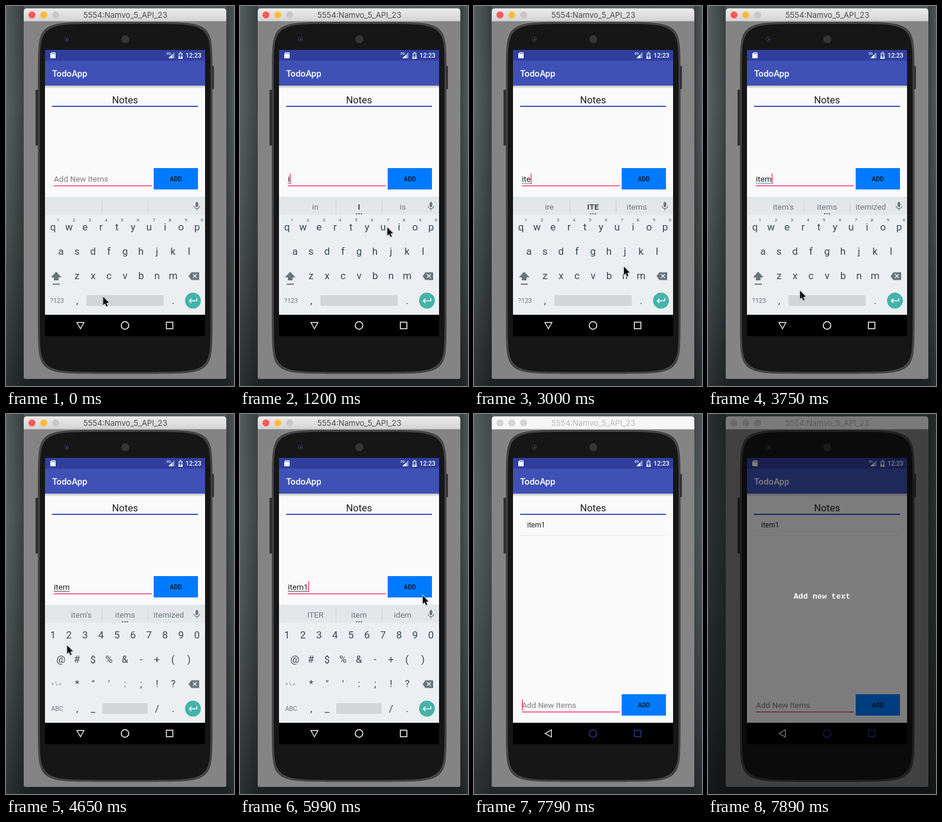
Recreate the animation shown at these times as an HTML page with a canvas. Size 386 px wide and 640 px high, loop 8 s.

```html
<!DOCTYPE html>
<html lang="en">
<head>
<meta charset="utf-8">
<title>Todo app demo</title>
<style>
html, body { margin: 0; width: 100%; height: 100%; overflow: hidden; background: #3b4445; }
canvas { display: block; }
</style>
</head>
<body>
<canvas id="stage" width="386" height="640"></canvas>
<script>
const ctx = document.getElementById('stage').getContext('2d');
const LOOP = 8000, STEP = 150;
const KEY_COLOR = '#37474f', SOFT_KEY = '#68757b', KEY_BG = '#eceff1';
const PINK = '#ff4081', INDIGO = '#3f51b5', STATUS = '#303f9f';

const KEY_STEP = 27.1, ROW_STEP = 41.25, ROW_INDENT = [79.5, 93, 120.3, 120.3];
const keyAt = (row, col) => ({ x: ROW_INDENT[row] + col * KEY_STEP, y: 372 + row * ROW_STEP });

// Pointer glides: leave time, arrival time, destination
const glides = [
  [-600, 0, { x: 164, y: 489 }],
  [0, 750, keyAt(0, 7)],
  [900, 1820, keyAt(0, 4)],
  [1820, 2300, keyAt(0, 2)],
  [2550, 3180, keyAt(2, 6)],
  [3300, 4050, { x: 86, y: 492 }],
  [4200, 4650, { x: 103, y: 389 }],
  [4650, 4950, keyAt(0, 0)],
  [5550, 5990, { x: 309, y: 305 }],
  [5990, 6590, { x: 300, y: 292 }],
  [6740, 7190, { x: 127, y: 538 }],
  [7190, 7340, { x: 121, y: 617 }]
];

const states = [
  { at: -600, entry: '', words: [] },
  { at: 900, entry: 'i', words: ['in', 'I', 'is'], strong: true },
  { at: 1650, entry: 'it', words: ['its', 'it', "it's"] },
  { at: 2550, entry: 'ite', words: ['ire', 'ITE', 'items'], strong: true },
  { at: 3300, entry: 'item', words: ["item's", 'items', 'itemized'] },
  { at: 4100, entry: 'item', words: ["item's", 'items', 'itemized'], symbols: true },
  { at: 5550, entry: 'item1', words: ['ITER', 'item', 'idem'], symbols: true },
  { at: 6890, entry: '', words: [], symbols: true, added: true },
  { at: 7340, entry: '', words: [], added: true, keyboardHidden: true }
];

function rect(x, y, w, h, color) {
  ctx.fillStyle = color;
  ctx.fillRect(x, y, w, h);
}

function round(x, y, w, h, r, color) {
  ctx.beginPath();
  ctx.roundRect(x, y, w, h, r);
  ctx.fillStyle = color;
  ctx.fill();
}

function disc(x, y, r, color) {
  ctx.beginPath();
  ctx.arc(x, y, r, 0, Math.PI * 2);
  ctx.fillStyle = color;
  ctx.fill();
}

function trace(points, closed) {
  ctx.beginPath();
  points.forEach(([x, y]) => ctx.lineTo(x, y));
  if (closed) ctx.closePath();
}

function fillPoly(color, ...points) {
  trace(points, true);
  ctx.fillStyle = color;
  ctx.fill();
}

function line(color, width, ...points) {
  trace(points, false);
  ctx.strokeStyle = color;
  ctx.lineWidth = width;
  ctx.stroke();
}

function text(str, x, y, size, color, { weight = 400, align = 'left', family = 'Roboto, sans-serif' } = {}) {
  ctx.font = `${weight} ${size}px ${family}`;
  ctx.textAlign = align;
  ctx.fillStyle = color;
  ctx.fillText(str, x, y);
}

const centered = (str, x, y, size, color, weight = 400) =>
  text(str, x, y, size, color, { weight, align: 'center' });

function gradient(x0, y0, x1, y1, ...colors) {
  const g = ctx.createLinearGradient(x0, y0, x1, y1);
  colors.forEach((c, i) => g.addColorStop(i / (colors.length - 1), c));
  return g;
}

function drawDesktop(active) {
  const shade = `rgba(0,0,0,${active ? 0.32 : 0.22})`;
  rect(0, 0, 386, 640, gradient(0, 0, 0, 640, '#525c5d', '#566262', '#4d5858', '#3f4849', '#2b3133'));
  rect(0, 0, 30, 640, gradient(0, 0, 30, 0, 'rgba(0,0,0,0)', shade));
  rect(373, 0, 13, 640, gradient(373, 0, 386, 0, shade, 'rgba(0,0,0,.08)'));
  rect(30, 628, 343, 12, shade);
}

function drawWindow(active) {
  round(30, 4, 343, 624, [5, 5, 3, 3], '#848484');
  round(30, 4, 343, 22, [5, 5, 0, 0], active ? gradient(0, 4, 0, 26, '#ececec', '#d3d3d3') : '#f6f6f6');
  rect(30, 25, 343, 1, active ? '#b5b5b5' : '#d9d9d9');
  ['#fc5b57', '#fdbb3f', '#c9c8c9'].forEach((c, i) => disc(44 + i * 20, 15, 6, active ? c : '#d5d5d5'));
  text('5554:Namvo_5_API_23', 202, 20, 13.2, active ? '#4b4b4b' : '#b8b8b8',
    { align: 'center', family: 'Inter, sans-serif' });
}

// Superellipse: nearly straight sides, slightly bowed ends
function phoneBody(inset, color) {
  const bend = (v, power) => Math.sign(v) * Math.abs(v) ** (2 / power);
  ctx.beginPath();
  for (let a = 0; a < Math.PI * 2; a += Math.PI / 240) {
    ctx.lineTo(201.8 + (147.7 - inset) * bend(Math.cos(a), 6.5),
               323.2 + (296.2 - inset) * bend(Math.sin(a), 20));
  }
  ctx.fillStyle = color;
  ctx.fill();
}

function drawPhone() {
  round(50, 141, 5, 94, 1, '#303030');
  round(348, 101, 4, 39, 1, '#303030');
  phoneBody(0, '#363636');
  phoneBody(1, '#494949');
  phoneBody(3, '#161616');
  disc(102, 56, 4.2, '#343438');
  disc(102, 56, 2.8, '#10101a');
  disc(102.6, 56.4, 1.3, '#4a4a86');
  disc(202, 56, 6.8, '#2a2a2a');
  for (let y = -5; y <= 5; y += 2.5) {
    for (let x = -5; x <= 5; x += 2.5) {
      if (Math.hypot(x, y) < 6) disc(202 + x, 56 + y, 0.75, '#5c5c5c');
    }
  }
}

function drawBars() {
  rect(66, 74, 271, 18, STATUS);
  rect(66, 92, 271, 42, INDIGO);
  rect(66, 134, 271, 5, gradient(0, 134, 0, 139, 'rgba(0,0,0,.25)', 'rgba(0,0,0,0)'));
  round(75, 78, 9, 10, [4, 1, 1, 1], '#fff');
  for (let x = 78; x < 83; x += 2) rect(x, 79, 1, 2, STATUS);
  fillPoly('#9aa3d0', [285, 78], [285, 88], [275, 88]);
  fillPoly('#fff', [281, 82], [281, 88], [275, 88]);
  text('3G', 271.5, 82, 6, '#fff', { weight: 500 });
  rect(294, 77.5, 3, 2, '#d0d4ea');
  round(292, 79, 7, 10, 0.8, '#a4acd6');
  rect(292, 85, 7, 4, '#fff');
  line(STATUS, 1.3, [296, 80], [294.5, 84], [296.5, 84], [295, 88]);
  text('12:23', 304, 87, 10.6, '#fff', { weight: 500 });
  text('TodoApp', 78, 119, 15, '#fff', { weight: 500 });
}

function drawNav(keyboardUp) {
  const white = '#f2f2f2';
  rect(66, 520, 271, 36, '#000');
  ctx.save();
  ctx.translate(126, 538);
  ctx.rotate(keyboardUp ? 0 : Math.PI / 2);
  line(white, 1.4, [-6, -5], [6, -5], [0, 5.5], [-6, -5], [6, -5]);
  ctx.restore();
  ctx.beginPath();
  ctx.arc(201.5, 538, 6.4, 0, Math.PI * 2);
  ctx.stroke();
  ctx.strokeRect(271.5, 532.5, 11, 11);
}

function drawApp(t, { at, entry, added, symbols, keyboardHidden }) {
  rect(66, 134, 271, 386, '#fafafa');
  drawBars();
  centered('Notes', 201.5, 164, 16.6, '#212121');
  rect(78, 168, 247, 2, INDIGO);
  if (added) {
    text('item1', 90, 191, 12, '#1c1c1c');
    rect(78, 204, 247, 1, '#ececec');
  }

  ctx.save();
  ctx.translate(0, keyboardHidden ? 199 : 0);
  text(entry || 'Add New Items', 81, 296, 13.55, entry ? '#212121' : '#7d7d7d');
  const width = entry && ctx.measureText(entry).width;
  rect(81, 298, width, 1, symbols ? '#4a4a4a' : '#35a0b4');
  rect(81, 302, 166, 1.6, PINK);
  if ((t - at) % 1000 < 500) rect(81 + Number(width), 282, 1.6, 18, PINK);
  rect(250, 273, 75, 36, '#007bff');
  centered('ADD', 287.5, 295, 10.5, '#06101c', 500);
  ctx.restore();
}

function keyRow(keys, row, firstCol = 0) {
  [...keys].forEach((key, i) => {
    const { x, y } = keyAt(row, firstCol + i);
    centered(key, x, Math.round(y + 5.8), 17, KEY_COLOR);
  });
}

function drawSuggestions({ words, strong }) {
  rect(66, 321, 271, 30.5, '#e4e7e9');
  rect(162, 328, 1, 19, '#ccd1d4');
  rect(240, 328, 1, 19, '#ccd1d4');
  words.forEach((word, i) => {
    const bold = strong && i === 1;
    centered(word, 127.5 + i * 74, 343, 13.55, bold ? KEY_COLOR : '#6b777d', bold ? 700 : 400);
    rect(196.5 + i * 4, 349, 2, 2, '#4b585e');
  });
  round(321, 330, 4.4, 8.6, 2.2, SOFT_KEY);
  ctx.beginPath();
  ctx.arc(323.2, 336.5, 4.7, 0, Math.PI);
  ctx.strokeStyle = SOFT_KEY;
  ctx.lineWidth = 1.2;
  ctx.stroke();
  rect(322.6, 341, 1.2, 3.5, SOFT_KEY);
}

function drawLetters() {
  keyRow('qwertyuiop', 0);
  [...'1234567890'].forEach((d, i) => centered(d, 88 + i * KEY_STEP, 363, 7.5, SOFT_KEY, 500));
  keyRow('asdfghjkl', 1);
  keyRow('zxcvbnm', 2);
  fillPoly(SOFT_KEY, [85, 447.5], [94, 457], [76, 457]);
  rect(81, 457, 8, 5, SOFT_KEY);
  rect(79, 467.5, 12, 2, SOFT_KEY);
  centered('?123', 86.5, 500, 10.8, SOFT_KEY);
  keyRow(',', 3);
  keyRow('.', 3, 6);
  round(136, 487, 131, 18, 2, '#d2d6d8');
}

function drawSymbols() {
  keyRow('1234567890', 0);
  keyRow('@#$%&-+()', 1);
  keyRow('*"\':;!?', 2);
  centered('= \\ <', 85, 458, 9, SOFT_KEY);
  centered('ABC', 86.5, 500, 10.5, SOFT_KEY);
  keyRow(',_', 3);
  keyRow('/.', 3, 5);
  round(163, 487, 77, 18, 2, '#d2d6d8');
}

function drawKeyboard(state) {
  rect(66, 351, 271, 169, KEY_BG);
  drawSuggestions(state);
  if (state.symbols) drawSymbols();
  else drawLetters();

  fillPoly(SOFT_KEY, [309, 455], [314, 448.5], [314, 461.5]);
  rect(313.5, 448.5, 13.5, 13, SOFT_KEY);
  line(KEY_BG, 1.5, [316.5, 451.5], [323, 458]);
  line(KEY_BG, 1.5, [323, 451.5], [316.5, 458]);

  disc(316.5, 496.2, 13.4, '#45b3a9');
  line('#fff', 1.5, [323, 492], [323, 496.5], [310.5, 496.5]);
  line('#fff', 1.5, [314, 492.8], [310.3, 496.5], [314, 500.2]);
}

function drawPointer(t) {
  const i = glides.findLastIndex(([leave]) => leave <= t);
  const [leave, arrive, to] = glides[i];
  const from = i ? glides[i - 1][2] : to;
  const k = Math.min(1, (t - leave) / (arrive - leave));
  const eased = k * k * (3 - 2 * k);
  ctx.save();
  ctx.translate(from.x + (to.x - from.x) * eased + 0.5, from.y + (to.y - from.y) * eased + 0.8);
  trace([[0, 0], [0, 14], [3.2, 11.2], [5.4, 16.3], [7.6, 15.4], [5.5, 10.3], [9.8, 10]], true);
  ctx.strokeStyle = '#fff';
  ctx.lineWidth = 1.6;
  ctx.shadowColor = 'rgba(0,0,0,.35)';
  ctx.shadowBlur = 2;
  ctx.stroke();
  ctx.shadowColor = 'transparent';
  ctx.fillStyle = '#000';
  ctx.fill();
  ctx.restore();
}

function draw(t) {
  const active = t < 7790;
  const state = states.findLast(s => s.at <= t);
  drawDesktop(active);
  drawWindow(active);
  drawPhone();
  drawApp(t, state);
  if (!state.keyboardHidden) drawKeyboard(state);
  drawNav(!state.keyboardHidden);
  if (active) drawPointer(t);
  if (t >= 7890) {
    rect(0, 0, 386, 640, 'rgba(0,0,0,.5)');
    text('Add new text', 193, 311, 13.33, '#fff',
      { weight: 700, align: 'center', family: '"Liberation Mono", monospace' });
  }
}

function held(t) {
  if (t >= 7890) return 7890;
  const lag = t < 5840 ? 0 : 10;
  return Math.floor((t + lag) / STEP) * STEP - lag;
}

const start = performance.now();
function tick() {
  draw(held((performance.now() - start) % LOOP));
  requestAnimationFrame(tick);
}
tick();
</script>
</body>
</html>
```
